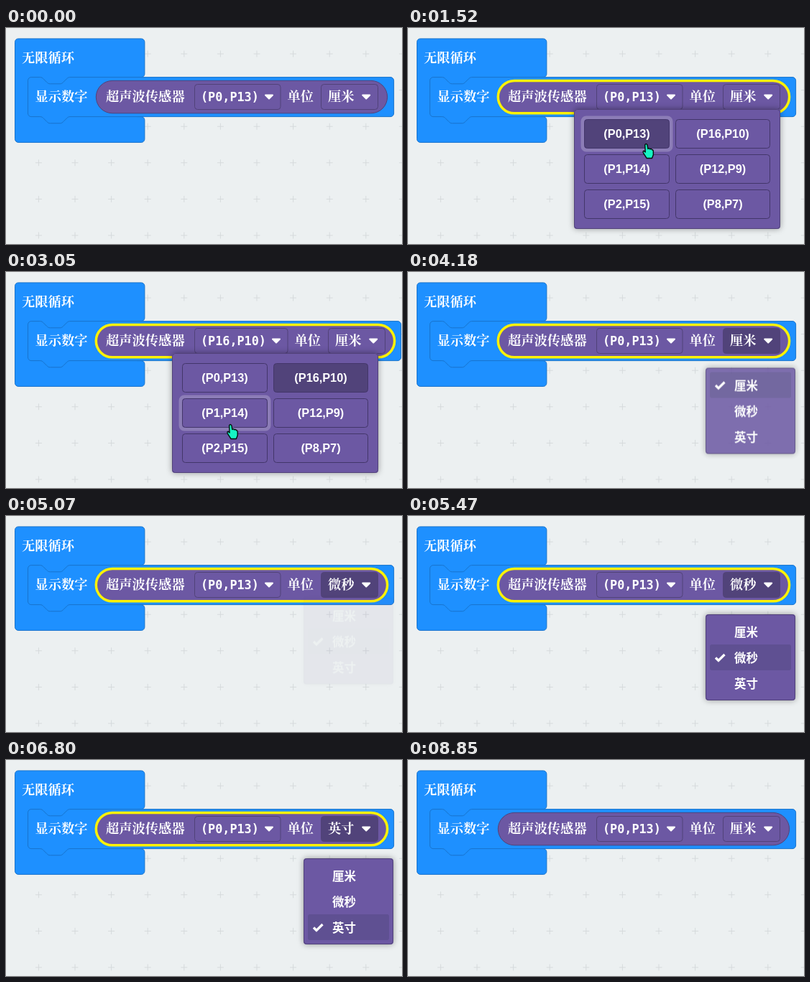
Recreate the animation shown at these times as an HTML page with a canvas. Size 551 px wide and 301 px high, loop 8890 ms.

```html
<!DOCTYPE html>
<html lang="zh">
<head>
<meta charset="utf-8">
<style>
html, body { margin: 0; width: 100%; height: 100%; overflow: hidden; background: #ecf0f1; }
canvas { display: block; }
</style>
</head>
<body>
<canvas id="stage" width="551" height="301"></canvas>
<script>
const W = 551, H = 301, LOOP = 8890;
const stage = document.getElementById('stage').getContext('2d');
const layerCanvas = document.createElement('canvas');
layerCanvas.width = W;
layerCanvas.height = H;
const layer = layerCanvas.getContext('2d');

const BLUE = '#1e90ff', BLUE_EDGE = '#1873cc';
const PURPLE = '#6c58a3', PURPLE_EDGE = '#514279', YELLOW = '#fff200';
const CJK = '"Noto Sans CJK SC", "Noto Sans CJK", sans-serif';
const BLOCK_FONT = `bold 18.3px "Noto Serif CJK SC", ${CJK}`;
const MENU_FONT = `bold 16.5px ${CJK}`;
const MONO_FONT = 'bold 16.8px "DejaVu Sans Mono", monospace';
const BUTTON_FONT = 'bold 16.3px "Liberation Sans", Arial, sans-serif';

const PINS = ['(P0,P13)', '(P16,P10)', '(P1,P14)', '(P12,P9)', '(P2,P15)', '(P8,P7)'];
const UNITS = ['厘米', '微秒', '英寸'];

// Popups: open and close times; snap marks a hard appearance or disappearance.
const pinMenus = [
  { open: 790, close: 1850, picked: 0 },
  { open: 2490, close: 3330, picked: 1, snapOpen: true }
];
const unitMenus = [
  { open: 4060, close: 4580, picked: 0, next: 1, hoverAt: 4400 },
  { open: 5070, close: 5690, picked: 1, next: 2, hoverAt: 5490 },
  { open: 6400, close: 8090, picked: 2, next: 2, hoverAt: 6800, snapClose: true }
];

// Cursor paths: [time, x, y] of the pointing tip.
const handPaths = [
  [[1360, 318, 152], [1520, 331, 161], [1580, 338, 162], [1760, 438, 158], [2160, 438, 158]],
  [[2650, 338, 146], [2760, 332, 152], [3050, 312, 212], [3210, 312, 212], [3330, 322, 153], [3650, 322, 153]]
];
const arrowPath = [[8250, 479, 177], [8410, 395, 156], [8570, 395, 156], [8850, 372, 302]];

// CSS "ease": cubic-bezier(.25, .1, .25, 1)
function ease(x) {
  if (x <= 0) return 0;
  if (x >= 1) return 1;
  const bez = (u, a, b) => 3 * u * (1 - u) ** 2 * a + 3 * u * u * (1 - u) * b + u ** 3;
  let lo = 0, hi = 1;
  for (let i = 0; i < 20; i++) {
    const mid = (lo + hi) / 2;
    if (bez(mid, .25, .25) < x) lo = mid; else hi = mid;
  }
  return bez(lo, .1, 1);
}

function visibility(menu, t) {
  if (t < menu.open) return 0;
  if (t < menu.close) return menu.snapOpen ? 1 : ease((t - menu.open + 18) / 250);
  return menu.snapClose ? 0 : 1 - ease((t - menu.close + 20) / 250);
}

function along(path, t) {
  if (t < path[0][0] || t >= path[path.length - 1][0]) return null;
  const i = path.findIndex(p => p[0] > t);
  const [t0, x0, y0] = path[i - 1], [t1, x1, y1] = path[i];
  const k = (t - t0) / (t1 - t0);
  return { x: x0 + (x1 - x0) * k, y: y0 + (y1 - y0) * k };
}

function box(c, x, y, w, h, r, fill, stroke, line = 1) {
  c.beginPath();
  c.roundRect(x, y, w, h, r);
  if (fill) { c.fillStyle = fill; c.fill(); }
  if (stroke) { c.strokeStyle = stroke; c.lineWidth = line; c.stroke(); }
}

function label(c, text, x, y, font, align = 'left') {
  c.font = font;
  c.textAlign = align;
  c.fillStyle = '#fff';
  c.fillText(text, x, y);
}

function grid(c) {
  c.strokeStyle = '#d6dadc';
  c.lineWidth = 1;
  c.beginPath();
  for (let x = -5.2; x < W + 5; x += 50.6) {
    for (let y = 36; y < H; y += 50.6) {
      c.moveTo(x - 4.5, y); c.lineTo(x + 4.5, y);
      c.moveTo(x, y - 4.5); c.lineTo(x, y + 4.5);
    }
  }
  c.stroke();
}

// Connector notch, drawn to the right (dir 1) or to the left (dir -1).
function notch(c, x, y, dir) {
  const s = 1.15, X = v => x + dir * v * s, Y = v => y + v * s;
  c.lineTo(x, y);
  c.bezierCurveTo(X(2), y, X(3), Y(1), X(4), Y(2));
  c.lineTo(X(8), Y(6));
  c.bezierCurveTo(X(9), Y(7), X(10), Y(8), X(12), Y(8));
  c.lineTo(X(24), Y(8));
  c.bezierCurveTo(X(26), Y(8), X(27), Y(7), X(28), Y(6));
  c.lineTo(X(32), Y(2));
  c.bezierCurveTo(X(33), Y(1), X(34), y, X(36), y);
}

function blueBlocks(c, right) {
  const top = 68.6, bottom = 123.6;
  c.fillStyle = BLUE;
  c.strokeStyle = BLUE_EDGE;
  c.lineWidth = 1;
  c.beginPath();
  c.roundRect(12.5, 14.9, 180.4, top - 14.9, [4.6, 4.6, 4.6, 0]);
  c.roundRect(12.5, bottom, 180.4, 159.4 - bottom, [0, 4.6, 4.6, 4.6]);
  c.fill();
  c.stroke();
  c.fillRect(12.5, 60, 170, 75);
  c.beginPath();
  c.moveTo(12.5, 60);
  c.lineTo(12.5, 135);
  c.stroke();

  c.beginPath();
  c.moveTo(30.5, 75);
  c.arcTo(30.5, top, 36, top, 4.6);
  notch(c, 47.5, top, 1);
  c.arcTo(right, top, right, 75, 4.6);
  c.arcTo(right, bottom, right - 6, bottom, 4.6);
  notch(c, 89, bottom, -1);
  c.arcTo(30.5, bottom, 30.5, 117, 4.6);
  c.closePath();
  c.fill();
  c.stroke();
}

function caret(c, x, y) {
  c.fillStyle = c.strokeStyle = '#fff';
  c.lineWidth = 2;
  c.lineJoin = 'round';
  c.beginPath();
  c.moveTo(x - 5, y - 2.5);
  c.lineTo(x + 5, y - 2.5);
  c.lineTo(x, y + 2.5);
  c.closePath();
  c.fill();
  c.stroke();
}

function program(c, pin, unit, selected, unitOpen) {
  const dx = pin === 1 ? 10 : 0;
  blueBlocks(c, 539.6 + dx);
  label(c, '无限循环', 22, 48, BLOCK_FONT);
  label(c, '显示数字', 40.5, 102, BLOCK_FONT);
  box(c, 125.3, 73.4, 405.3 + dx, 45.4, 22.7, PURPLE, selected ? YELLOW : PURPLE_EDGE, selected ? 3.5 : 1);
  label(c, '超声波传感器', 139, 102, BLOCK_FONT);
  box(c, 262.5, 78.5, 119.5 + dx, 35, 4, PURPLE, PURPLE_EDGE);
  label(c, PINS[pin], 271, 102, MONO_FONT);
  caret(c, 366 + dx, 96);
  label(c, '单位', 391.5 + dx, 102, BLOCK_FONT);
  box(c, 438.5 + dx, 78.5, 79, 35, 4, unitOpen ? '#51437a' : PURPLE, PURPLE_EDGE);
  label(c, UNITS[unit], 448 + dx, 102, BLOCK_FONT);
  caret(c, 501.2 + dx, 96);
}

function panel(c, x, y, w, h) {
  c.save();
  c.shadowColor = 'rgba(0,0,0,.38)';
  c.shadowBlur = 9;
  box(c, x, y, w, h, 4, PURPLE);
  c.restore();
  box(c, x + .5, y + .5, w - 1, h - 1, 4, null, '#514279');
}

function cell(i) {
  const col = i % 2;
  return { x: col ? 372.5 : 245.5, y: 127.5 + 49 * (i >> 1), w: col ? 131 : 118, h: 40 };
}

function pinMenu(c, picked, hand) {
  panel(c, 231, 113, 287, 167);
  PINS.forEach((text, i) => {
    const { x, y, w, h } = cell(i);
    const over = hand && hand.x > x && hand.x < x + w && hand.y > y - 5 && hand.y < y + h + 4;
    if (over) box(c, x - 2.5, y - 2.5, w + 5, h + 5, 5, null, 'rgba(255,255,255,.22)', 5);
    box(c, x, y, w, h, 4, i === picked ? '#51437a' : PURPLE, '#43366a');
    label(c, text, x + w / 2, y + 25.5, BUTTON_FONT, 'center');
  });
}

function unitMenu(c, picked, hover) {
  panel(c, 414, 137, 125, 120);
  box(c, 420, 143 + 36 * hover, 113, 36, 3, '#5f5092');
  UNITS.forEach((text, i) => label(c, text, 454, 168 + 36 * i, MENU_FONT));
  const y = 161 + 36 * picked;
  c.strokeStyle = '#fff';
  c.lineWidth = 3.3;
  c.lineJoin = 'miter';
  c.beginPath();
  c.moveTo(428, y + .5);
  c.lineTo(432, y + 4.5);
  c.lineTo(440.5, y - 4);
  c.stroke();
}

function popup(alpha, paint) {
  if (alpha <= 0) return;
  layer.clearRect(0, 0, W, H);
  paint(layer);
  stage.globalAlpha = alpha;
  stage.drawImage(layerCanvas, 0, -24 * (1 - alpha));
  stage.globalAlpha = 1;
}

const HAND = 'M-1.5 2Q0-1 2 2L3 8Q5 6 6 8.5Q8 7 9 9.5Q11 9 11 12L11 17L9 22L1 22L-4 14Q-5 11-3 11L-1 13Z';
const ARROW = 'M0 0L0 16L4 12.5L7 19L10 17.5L7 11.5L12 11Z';

function cursor(c, shape, at) {
  if (!at) return;
  c.save();
  c.translate(at.x, at.y);
  c.scale(.93, .93);
  const path = new Path2D(shape);
  c.fillStyle = '#16f5c4';
  c.strokeStyle = '#05100e';
  c.lineWidth = 1.5;
  c.lineJoin = 'round';
  c.fill(path);
  c.stroke(path);
  c.restore();
}

function draw(t) {
  const pin = t >= pinMenus[0].close && t < pinMenus[1].close ? 1 : 0;
  const unit = t < 4580 || t >= 8090 ? 0 : t < 5690 ? 1 : 2;
  const unitOpen = unitMenus.some(m => t >= m.open && t < m.close);
  const hand = along(handPaths[0], t) || along(handPaths[1], t);

  stage.fillStyle = '#ecf0f1';
  stage.fillRect(0, 0, W, H);
  grid(stage);
  program(stage, pin, unit, t >= 750 && t < 8570, unitOpen);
  for (const m of pinMenus) popup(visibility(m, t), c => pinMenu(c, m.picked, hand));
  for (const m of unitMenus) {
    popup(visibility(m, t), c => unitMenu(c, m.picked, t < m.hoverAt ? m.picked : m.next));
  }
  cursor(stage, HAND, hand);
  cursor(stage, ARROW, along(arrowPath, t));
}

const start = performance.now();
function frame() {
  draw((performance.now() - start) % LOOP);
  requestAnimationFrame(frame);
}
frame();
</script>
</body>
</html>
```
